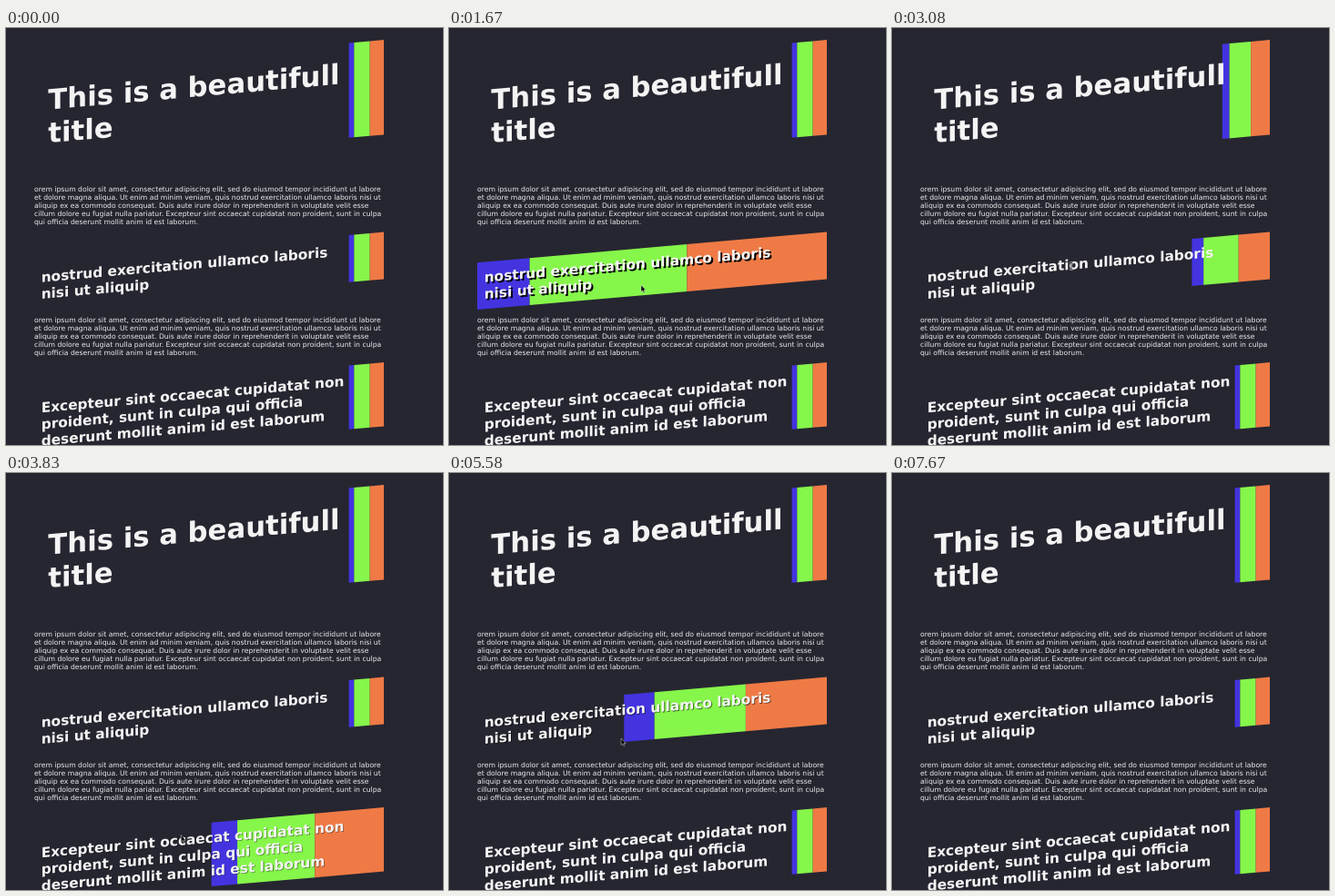
Recreate the animation shown at these times as an HTML page. Size 480 by 459 pixels, loop 8410 ms.

```html
<!DOCTYPE html>
<html lang="en">
<head>
<meta charset="utf-8">
<title>Hover headings</title>
<style>
  html, body { margin: 0; width: 100%; height: 100%; overflow: hidden; background: #262631; }
  svg { display: block; width: 100vw; height: 100vh; }
  text { font-family: "DejaVu Sans", sans-serif; font-size: 7.68px; fill: #ececee; text-rendering: geometricPrecision; white-space: pre; }
  .head text { font-weight: bold; fill: #f4f4f4; }
  .head .shadow { fill: #000; }
</style>
</head>
<body>
<svg id="stage" viewBox="0 0 480 459" preserveAspectRatio="none"></svg>
<script>
const LOOP = 8410, FADE = 300;
const LEFT = 31, WIDTH = 384, REST = 0.1;
const SLOPE = Math.tan(5 * Math.PI / 180);
const SHADOW = 1.92;
const stage = document.getElementById('stage');

const LOREM = [
  'orem ipsum dolor sit amet, consectetur adipiscing elit, sed do eiusmod tempor incididunt ut labore',
  'et dolore magna aliqua. Ut enim ad minim veniam, quis nostrud exercitation ullamco laboris nisi ut',
  'aliquip ex ea commodo consequat. Duis aute irure dolor in reprehenderit in voluptate velit esse',
  'cillum dolore eu fugiat nulla pariatur. Excepteur sint occaecat cupidatat non proident, sunt in culpa',
  'qui officia deserunt mollit anim id est laborum.'
];

// hover: [enter, leave] times in ms
const HEADS = [
  { top: 29.9, height: 104.4, size: 30.72, step: 36.6,
    lines: ['This is a beautifull', 'title'],
    hover: [[370, 1150], [2190, 2793], [4414, 5000], [6606, 7050]] },
  { top: 241.4, height: 51.9, size: 15.36, step: 18.25,
    lines: ['nostrud exercitation ullamco laboris', 'nisi ut aliquip'],
    hover: [[1350, 1960], [3040, 3480], [4200, 4290], [5421, 6360]] },
  { top: 384.9, height: 70.4, size: 15.36, step: 18.25,
    lines: ['Excepteur sint occaecat cupidatat non', 'proident, sunt in culpa qui officia', 'deserunt mollit anim id est laborum'],
    hover: [[3700, 4090]] }
];

// pointer path: time, x, y
const PATH = [
  [170, 205, 152], [600, 207, 93], [1090, 207, 93], [1350, 208, 243],
  [1670, 211, 283], [1850, 211, 283], [2430, 204, 88], [2740, 204, 88],
  [3080, 197, 262], [3420, 195, 278], [3870, 192, 410], [4050, 192, 405],
  [4420, 188, 136], [4670, 184, 70], [4925, 184, 70], [5421, 187, 245],
  [5580, 189, 292], [6220, 203, 278], [6606, 210, 135], [6750, 211, 102],
  [7000, 211, 102], [7420, 211, 155]
];
const OVER_TEXT = [[3040, 3300], [4560, 4980]];

function add(parent, tag, attrs, text) {
  const el = document.createElementNS('http://www.w3.org/2000/svg', tag);
  for (const key in attrs) el.setAttribute(key, attrs[key]);
  if (text) el.textContent = text;
  return parent.appendChild(el);
}

function addLines(parent, lines, x, y, step, attrs) {
  lines.forEach((line, i) => add(parent, 'text', { x, y: y + i * step, ...attrs }, line));
}

function buildHead(head) {
  const { top, height, size, step, lines } = head;
  const shift = SLOPE * (LEFT + WIDTH / 2);
  const group = add(stage, 'g', { class: 'head', transform: `matrix(1 ${-SLOPE} 0 1 0 ${shift})` });
  head.bars = ['#4334e0', '#86f64a', '#ef7a45'].map(fill =>
    add(group, 'rect', { y: top, height, fill }));
  const x = LEFT + size / 2;
  const y = top + size / 2 + (step - size * 1.164) / 2 + size * 0.928;
  const style = `font-size:${size}px`;
  head.shadow = add(group, 'g', {});
  addLines(head.shadow, lines, x, y, step, { style, class: 'shadow' });
  addLines(group, lines, x, y, step, { style });
}

function hoverLevel(spans, t) {
  return Math.max(0, ...spans.map(([enter, leave]) => {
    const peak = Math.min(1, (leave - enter) / FADE);
    return Math.min(peak, (t - enter) / FADE, peak - (t - leave) / FADE);
  }));
}

function drawHead(head, t) {
  const level = hoverLevel(head.hover, t);
  const width = WIDTH * (REST + (1 - REST) * level);
  const right = LEFT + WIDTH;
  const stops = [0, 0.15, 0.6, 1].map(p => right - width * (1 - p));
  head.bars.forEach((bar, i) => {
    bar.setAttribute('x', stops[i]);
    bar.setAttribute('width', stops[i + 1] - stops[i]);
  });
  const offset = SHADOW * level;
  head.shadow.setAttribute('transform', `translate(${offset} ${offset})`);
  head.shadow.setAttribute('opacity', level);
}

function drawPointer(t) {
  const next = PATH.findIndex(key => key[0] > t);
  const shown = next > 0;
  pointer.setAttribute('visibility', shown ? 'visible' : 'hidden');
  if (!shown) return;
  const a = PATH[next - 1], b = PATH[next];
  const p = (t - a[0]) / (b[0] - a[0]);
  const [x, y] = [1, 2].map(i => a[i] + (b[i] - a[i]) * p);
  const overText = OVER_TEXT.some(([from, to]) => t >= from && t < to);
  pointer.setAttribute('transform', `translate(${x} ${y})`);
  arrow.setAttribute('display', overText ? 'none' : 'inline');
  beam.setAttribute('display', overText ? 'inline' : 'none');
}

HEADS.forEach(buildHead);
addLines(stage, LOREM, LEFT, 180, 9.12);
addLines(stage, LOREM, LEFT, 323.5, 9.12);

const pointer = add(stage, 'g', {});
const arrow = add(pointer, 'path', {
  d: 'M0 0V7.4L1.7 5.9L2.8 8.4L4 7.9L2.9 5.5H5.1Z',
  fill: '#000', stroke: '#ddd', 'stroke-width': 0.5
});
const beam = add(pointer, 'g', { fill: 'none' });
const beamPath = 'M-1.6 -3.8H1.6M0 -3.8V3.8M-1.6 3.8H1.6';
add(beam, 'path', { d: beamPath, stroke: '#ddd', 'stroke-width': 1.6 });
add(beam, 'path', { d: beamPath, stroke: '#000', 'stroke-width': 0.7 });

function draw(t) {
  HEADS.forEach(head => drawHead(head, t));
  drawPointer(t);
}

const start = performance.now();
function tick() {
  draw((performance.now() - start) % LOOP);
  requestAnimationFrame(tick);
}
tick();
</script>
</body>
</html>
```
